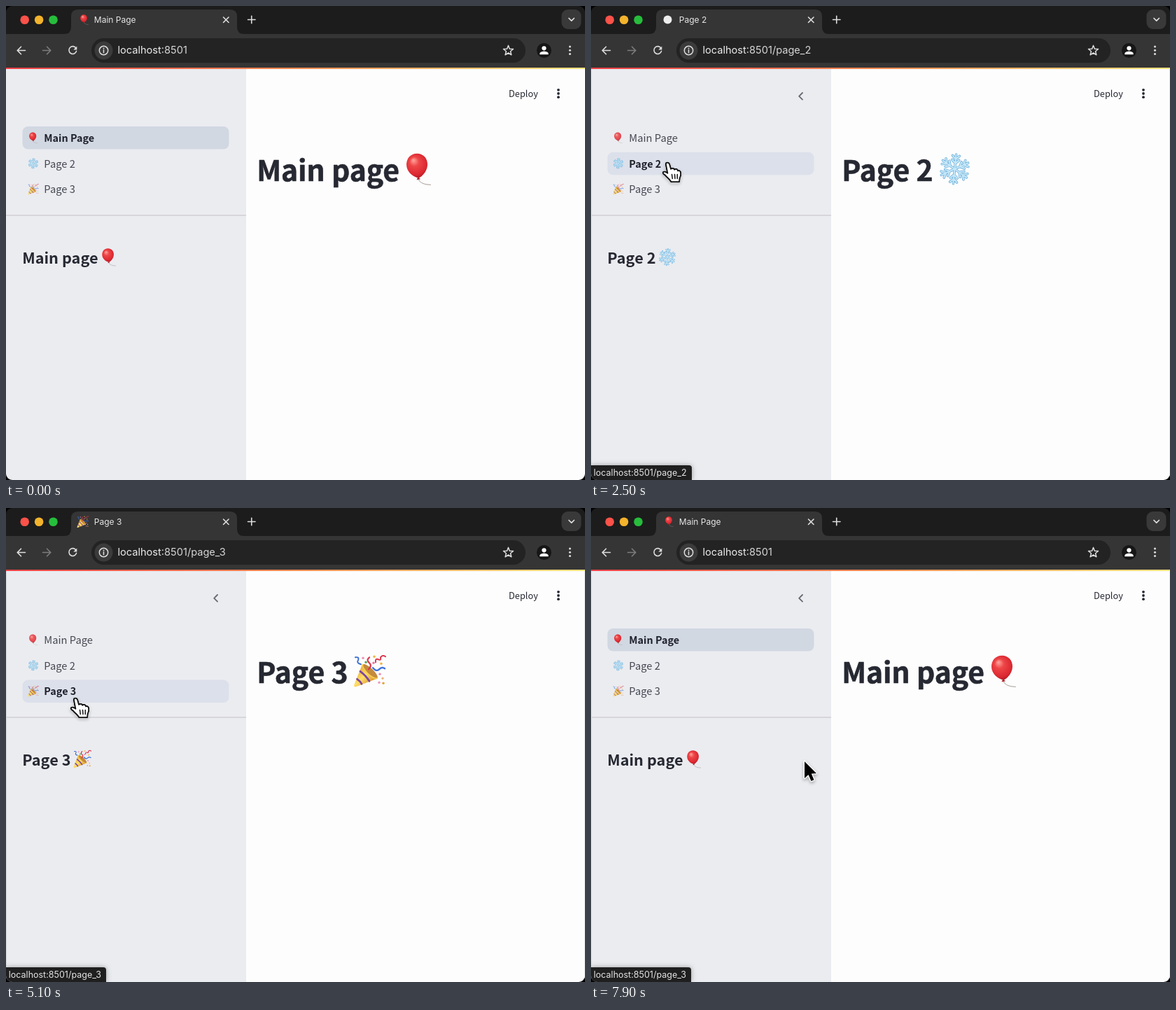
Write an HTML page with a canvas that moves like this. It is 827 px wide and 677 px high and loops after 8000 ms.

```html
<!DOCTYPE html>
<html lang="en">
<head>
<meta charset="utf-8">
<title>Multipage app</title>
<style>
html, body { margin: 0; width: 100%; height: 100%; overflow: hidden; background: #000; }
canvas { display: block; }
</style>
</head>
<body>
<canvas id="stage" width="827" height="677"></canvas>
<script>
const W = 827, H = 677, LOOP = 8000;
const ctx = document.getElementById('stage').getContext('2d');
const UI = 'Inter, Roboto, sans-serif';
const BODY = '"Noto Sans CJK JP", "Noto Sans CJK SC", "Noto Sans CJK", "Noto Sans", sans-serif';

const pages = [
  { nav: 'Main Page', title: 'Main page', path: 'localhost:8501', icon: balloon, bigX: 567, smallX: 134.5 },
  { nav: 'Page 2', title: 'Page 2', path: 'localhost:8501/page_2', icon: snowflake, bigX: 497, smallX: 96.5 },
  { nav: 'Page 3', title: 'Page 3', path: 'localhost:8501/page_3', icon: popper, bigX: 497, smallX: 96.5 }
];

// [start, value] steps
const pageSteps = [[0, 0], [2300, 1], [4900, 2], [7600, 0]];
const faviconSteps = [[0, 0], [2300, -1], [2600, 1], [4900, -1], [5000, 2], [7600, -1], [7750, 0]];
const statusSteps = [[0, -1], [1700, 1], [3300, 2], [6500, 0], [7700, 2]];
// [time, x, y]
const cursorKeys = [
  [400, 600, 560], [1250, 111, 219], [1500, 111, 219], [1800, 110, 223], [2800, 110, 223],
  [3350, 99, 282], [3700, 99, 282], [4150, 100, 271], [5400, 100, 271], [5700, 100, 268],
  [6320, 100, 268], [6600, 92, 190], [7500, 92, 190], [7900, 305, 362]
];

const stepAt = (steps, t) => steps.filter(s => s[0] <= t).pop()[1];
const ease = k => k * k * (3 - 2 * k);

function cursorAt(t) {
  if (t < cursorKeys[0][0]) return null;
  const i = cursorKeys.findIndex(k => k[0] > t);
  if (i < 0) return cursorKeys[cursorKeys.length - 1].slice(1);
  const [t0, x0, y0] = cursorKeys[i - 1], [t1, x1, y1] = cursorKeys[i];
  const k = ease((t - t0) / (t1 - t0));
  return [x0 + (x1 - x0) * k, y0 + (y1 - y0) * k];
}

function rect(x, y, w, h, color, r = 0) {
  ctx.fillStyle = color;
  ctx.beginPath();
  ctx.roundRect(x, y, w, h, r);
  ctx.fill();
}

function disc(x, y, r, color) {
  ctx.fillStyle = color;
  ctx.beginPath();
  ctx.arc(x, y, r, 0, 7);
  ctx.fill();
}

function text(str, x, y, font, color, weight = 0) {
  ctx.font = font;
  ctx.fillStyle = ctx.strokeStyle = color;
  ctx.fillText(str, x, y);
  if (weight) {
    ctx.lineWidth = weight;
    ctx.strokeText(str, x, y);
  }
}

function line(d, color, width = 1.6) {
  ctx.strokeStyle = color;
  ctx.lineWidth = width;
  ctx.stroke(new Path2D(d));
}

function shape(d, color) {
  ctx.fillStyle = color;
  ctx.fill(new Path2D(d));
}

function at(x, y, scale, draw) {
  ctx.save();
  ctx.translate(x, y);
  ctx.scale(scale, scale);
  draw();
  ctx.restore();
}

// Emoji are drawn in a 45 x 45 box
const emoji = (draw, x, y, size) => at(x, y, size / 45, draw);

function balloon() {
  line('M22 37C24 43 32 45 39.5 45', '#a59b96', 1);
  const g = ctx.createRadialGradient(15, 10, 1, 19, 17, 20);
  g.addColorStop(0, '#ff9a93');
  g.addColorStop(0.3, '#ee4648');
  g.addColorStop(0.75, '#dc2932');
  g.addColorStop(1, '#a81722');
  shape('M20 .5C29 .5 35 7.5 35 16C35 25 28 33 22.5 35.5C13 33.5 5 26 5 16C5 7.5 11 .5 20 .5Z', g);
  shape('M21.5 34L25 37L19.5 38Z', '#b31c26');
}

function snowflake() {
  const arm = 'M0 0V-21M0-8L-5-13M0-8L5-13M0-14L-5-19M0-14L5-19';
  for (const [color, width] of [['#62a9d8', 3.5], ['#c4e7f8', 2.1]]) {
    for (let i = 0; i < 6; i++) {
      ctx.save();
      ctx.translate(22.5, 22.5);
      ctx.rotate(i * Math.PI / 3 + 0.1);
      line(arm, color, width);
      ctx.restore();
    }
  }
}

function popper() {
  const g = ctx.createLinearGradient(6, 22, 24, 40);
  g.addColorStop(0, '#eab03a');
  g.addColorStop(0.45, '#ffdf6b');
  g.addColorStop(1, '#dd9a2e');
  shape('M0 43L12 13C20 14 33 25 34 33L3 45Q0 46 0 43Z', g);
  line('M9 23Q17 29 22 37M4.5 34Q9 37 11 41', '#7d469f', 2.8);
  at(23, 23, 1, () => {
    ctx.rotate(0.76);
    ctx.fillStyle = '#c58a3c';
    ctx.beginPath();
    ctx.ellipse(0, 0, 14, 4.5, 0, 0, 7);
    ctx.fill();
    line('M-14 0A14 4.5 0 0 0 14 0', '#f7cc52', 1.8);
  });
  line('M2 3Q8 2 6 7Q3 11 10 13', '#3c70d2', 2);
  line('M27 18Q32 24 36 20Q40 16 44 19', '#3b73dc', 2.4);
  line('M21 20Q26 15 22 11Q17 7 22 3', '#d9364b', 2.2);
  line('M31 10Q30 4 35 6Q39 8 38 3Q41-1 45 2', '#dc394f', 2);
  const bits = [[13, 4, '#f08fb4'], [17, 10, '#5ba35c'], [29, 2, '#f0b642'], [28, 11, '#e879a7'],
    [39, 12, '#efb33a'], [37, 27, '#ee8eb0'], [41, 33, '#efb77b'], [36, 39, '#ee9ab6'], [42, 40, '#e4a23d']];
  for (const [x, y, color] of bits) disc(x, y, 1.7, color);
}

function browser(page, favicon) {
  rect(0, 0, W, 88, '#1c1c1c');
  rect(0, 40, W, 48, '#353535');
  ['#fb5249', '#f4b32c', '#27bd3c'].forEach((c, i) => disc(26.7 + i * 20.4, 19.8, 6.3, c));
  shape('M83 40Q93 40 93 30V15Q93 5 103 5H320Q330 5 330 15V30Q330 40 340 40Z', '#353535');

  if (favicon < 0) disc(109.5, 19.5, 6, '#eeeeee');
  else if (favicon === 0) emoji(balloon, 104.6, 12, 14.5);
  else emoji(pages[favicon].icon, 101.5, 11.5, 16.5);
  text(page.nav, 125.8, 24, '12px ' + UI, '#e6e6e6');

  const light = '#dedede';
  line('M310.5 16L318 23.5M318 16L310.5 23.5', light);
  line('M345.5 19.5H356M350.75 14.3V24.8', light);
  rect(793.5, 5, 28, 28, '#393939', 9);
  line('M804 17.5L807.7 21.2L811.4 17.5', light, 1.7);

  line('M27.5 63.5H16.5M21.5 58.2L16.2 63.5L21.5 68.8', light);
  line('M52.5 63.5H63.5M58.5 58.2L63.8 63.5L58.5 68.8', '#7c7c7c');
  line('M100 60.2A5.4 5.4 0 1 0 100.6 64.4', light);
  shape('M101.3 57.4V62.4H96.3Z', light);

  rect(122, 46, 620, 35, '#232323', 17.5);
  disc(139.5, 63.5, 13, '#3b3b3b');
  line('M145.7 63.5A6.2 6.2 0 1 1 133.3 63.5A6.2 6.2 0 1 1 145.7 63.5M139.5 62.7V66.8', light, 1.5);
  disc(139.5, 60.5, 0.9, light);
  const urlFont = '14.6px ' + UI;
  text('localhost', 159.5, 68.4, urlFont, '#ececec');
  const hostEnd = 159.5 + ctx.measureText('localhost').width;
  text(page.path.slice(9), hostEnd, 68.4, urlFont, '#d6d6d6');

  ctx.strokeStyle = light;
  ctx.lineWidth = 1.5;
  ctx.beginPath();
  for (let i = 0; i < 10; i++) {
    const a = i * Math.PI / 5 - Math.PI / 2, r = i % 2 ? 3.2 : 7.4;
    ctx.lineTo(717.5 + r * Math.cos(a), 63.8 + r * Math.sin(a));
  }
  ctx.closePath();
  ctx.stroke();

  disc(768.5, 63.5, 10.5, '#161616');
  disc(768.5, 60.3, 3.1, '#fff');
  shape('M762.3 69.3V68C762.3 65.6 766 64.7 768.5 64.7S774.7 65.6 774.7 68V69.3Z', '#fff');
  for (const y of [58, 63.3, 68.6]) disc(805.5, y, 1.5, light);
}

function content(page, pageIndex, hover, chevron) {
  rect(0, 88, 343, H - 88, '#ebecf0');
  rect(343, 88, W - 343, H - 88, '#fdfdfd');
  const g = ctx.createLinearGradient(0, 0, W, 0);
  g.addColorStop(0, '#ee3f46');
  g.addColorStop(0.5, '#f58a50');
  g.addColorStop(1, '#f3e27a');
  rect(0, 88, W, 2, g);

  pages.forEach((p, i) => {
    const y = 172 + i * 36.8, active = i === pageIndex;
    if (i === hover) rect(23.5, y, 295, 32.5, '#dce0ea', 8);
    else if (active) rect(23.5, y, 295, 32.5, '#d1d8e2', 8);
    ctx.globalAlpha = active ? 1 : 0.85;
    emoji(p.icon, 31.4, y + 8.4, 15.2);
    ctx.globalAlpha = 1;
    text(p.nav, 54.3, y + 21.8, (active ? 'bold 14.4px ' : '14.7px ') + BODY, active ? '#1f212b' : '#464852');
  });
  rect(0, 298.4, 343, 1, '#c1c2c7');
  if (chevron) line('M302 124L297.2 128.8L302 133.6', '#696b73', 1.9);

  text(page.title, 23.2, 367.6, 'bold 21.7px ' + BODY, '#262832');
  emoji(page.icon, page.smallX, 346, 25);
  text(page.title, 358.2, 250, 'bold 40.8px ' + BODY, '#262832', 0.6);
  emoji(page.icon, page.bigX, 210.3, 45);

  text('Deploy', 718, 130, '12.8px ' + BODY, '#262832');
  for (const y of [119.8, 125, 130.2]) disc(789, y, 1.9, '#262832');
}

function statusBar(label) {
  const font = '12.5px ' + UI;
  ctx.font = font;
  const w = Math.round(ctx.measureText(label).width + 11);
  ctx.save();
  ctx.shadowColor = 'rgba(0,0,0,.35)';
  ctx.shadowBlur = 7;
  rect(0, 656, w, 21, '#1f1f1f', [0, 4, 0, 0]);
  ctx.restore();
  text(label, 3.8, 671, font, '#e3e3e3');
}

const arrowPath = 'M0 0V24L5.5 19L9.5 28L13.5 26.2L9.8 17.5L17 17Z';
const handPath = 'M-3 3C-3 0 1 0 2 3L4 10C6 8 9 9 9 11C11 9 13.5 10 14 12.5C16 11.5 18 13 18 15.5' +
  'C18.5 18 18 20 16.5 23L16 28H4.5C3 25-1 22-3.5 19C-6 17-8 16-7 14.5C-5.5 13-2.5 14-.5 16Z';

function pointer(x, y, hand) {
  at(x, y, 1, () => {
    ctx.save();
    ctx.shadowColor = 'rgba(0,0,0,.35)';
    ctx.shadowBlur = 4;
    ctx.shadowOffsetY = 2;
    line(hand ? handPath : arrowPath, hand ? '#111' : '#fff', hand ? 2 : 2.6);
    ctx.restore();
    shape(hand ? handPath : arrowPath, hand ? '#fff' : '#000');
    if (hand) {
      line(handPath, '#111', 1.6);
      line('M5.5 17.5L6.3 23.5M9.5 17.5L10 23.5M13.3 17.5V23.5', '#111', 1.5);
    }
  });
}

function draw(t) {
  const pageIndex = stepAt(pageSteps, t), page = pages[pageIndex];
  const status = stepAt(statusSteps, t);
  const pos = cursorAt(t);
  const hover = pos && pos[0] > 23 && pos[0] < 319
    ? pages.findIndex((p, i) => pos[1] >= 172 + i * 36.8 && pos[1] <= 204.5 + i * 36.8) : -1;

  ctx.fillStyle = '#000';
  ctx.fillRect(0, 0, W, H);
  ctx.save();
  ctx.lineCap = ctx.lineJoin = 'round';
  ctx.beginPath();
  ctx.roundRect(0, 0, W, H, 9);
  ctx.clip();
  browser(page, stepAt(faviconSteps, t));
  content(page, pageIndex, hover, pos && pos[0] < 343);
  if (pos) {
    rect(0, 90, 1, H - 90, '#d6d7da');
    rect(W - 1, 90, 1, H - 90, '#e4e4e4');
  }
  if (status >= 0) statusBar(pages[status].path);
  if (pos) pointer(pos[0], pos[1], hover >= 0);
  ctx.restore();
}

const start = performance.now();
function tick() {
  draw((performance.now() - start) % LOOP);
  requestAnimationFrame(tick);
}
tick();
</script>
</body>
</html>
```
